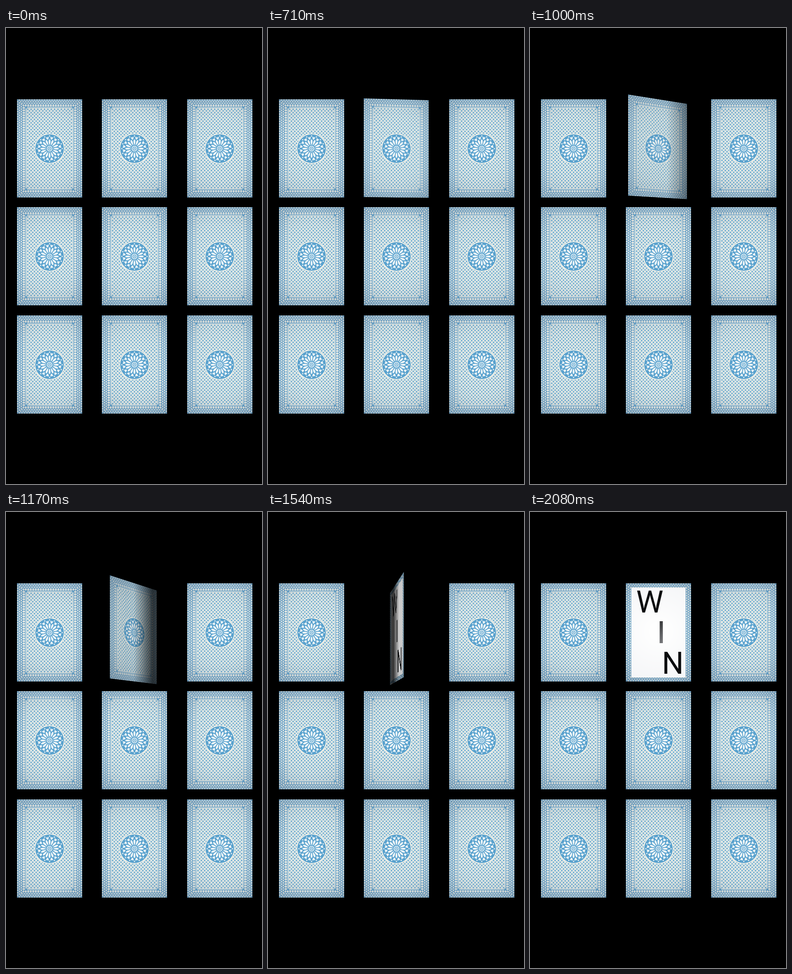
Write an HTML page with a canvas that moves like this. It is 561 by 998 pixels and loops after 2120 ms.

```html
<!DOCTYPE html>
<html lang="en">
<head>
<meta charset="utf-8">
<title>Card flip</title>
<style>
html, body { margin: 0; width: 100%; height: 100%; background: #000; overflow: hidden; }
#stage { position: absolute; left: 0; top: 0; width: 561px; height: 998px;
  perspective: 1030px; perspective-origin: 280.5px 499px; }
.card { position: absolute; width: 143px; height: 215px; }
.flip { transform-style: preserve-3d; }
.face, .face > * { position: absolute; left: 0; top: 0; width: 143px; height: 215px; }
.flip .face { backface-visibility: hidden; }
.front { transform: rotateY(180deg); }
.front .shade { transform: scaleX(-1); }
text { font: 67px Roboto, Lato, sans-serif; text-anchor: middle; fill: #0b0c0e; }
</style>
</head>
<body>
<div id="stage"></div>
<script>
const W = 143, H = 215, BLUE = '#4c9bcb', LINE = '#5a9fcb', CREAM = '#f1f1e8';
const stage = document.getElementById('stage');

function add(parent, tag, cls = '') {
  const el = document.createElement(tag);
  el.className = cls;
  return parent.appendChild(el);
}

// One mitred border side, running along x with its outer edge at y = 0
function side(c, length, depth, inset) {
  c.beginPath();
  c.moveTo(0, 0);
  c.lineTo(length, 0);
  c.lineTo(length - inset, depth);
  c.lineTo(inset, depth);
  c.clip();
  c.fillStyle = '#5496c4';
  c.fillRect(0, 0, length, depth);
  c.scale(1, depth / 19);
  c.fillStyle = '#e9ede6';
  c.fillRect(0, 16.6, length, 1.6);
  const n = Math.round(length / 5.4), step = length / n;
  [[1.8, 1.8], [5.5, 1.8], [9.2, 1.8], [13.9, 3.2]].forEach(([y, h], row) => {
    for (let i = 0; i <= n; i++) {
      const x = (i + row % 2 / 2) * step;
      c.beginPath();
      c.moveTo(x - step / 2, y);
      c.lineTo(x, y - h);
      c.lineTo(x + step / 2, y);
      c.lineTo(x, y + h);
      c.fill();
    }
  });
}

// Four-pointed star with concave sides
function star(c, x, y, r) {
  c.beginPath();
  c.moveTo(x + r, y);
  c.quadraticCurveTo(x, y, x, y + r);
  c.quadraticCurveTo(x, y, x - r, y);
  c.quadraticCurveTo(x, y, x, y - r);
  c.quadraticCurveTo(x, y, x + r, y);
  c.fill();
}

function disc(c, x, y, r, fill) {
  c.fillStyle = fill;
  c.beginPath();
  c.arc(x, y, r, 0, 7);
  c.fill();
}

function rosette(c) {
  const white = '#f4f8f8';
  disc(c, 0, 0, 33, CREAM);
  disc(c, 0, 0, 31.2, BLUE);
  for (let i = 0; i < 16; i++) {
    c.save();
    c.rotate(i * Math.PI / 8);
    c.fillStyle = white;
    c.beginPath();
    c.moveTo(0, -7);
    c.bezierCurveTo(1.6, -12, 3.6, -18, 0, -20.5);
    c.bezierCurveTo(-3.6, -18, -1.6, -12, 0, -7);
    c.fill();
    disc(c, 0, -27.6, 1.5, '#dbe9ef');
    c.rotate(Math.PI / 16);
    c.fillStyle = white;
    c.beginPath();
    c.moveTo(0, -19.5);
    c.quadraticCurveTo(4.8, -25, 1.6, -26);
    c.lineTo(0, -24.6);
    c.lineTo(-1.6, -26);
    c.quadraticCurveTo(-4.8, -25, 0, -19.5);
    c.fill();
    c.restore();
  }
  disc(c, 0, 0, 6, white);
  disc(c, 0, 0, 4.4, BLUE);
  disc(c, 0, 0, 2.8, white);
  disc(c, 0, 0, 1.4, BLUE);
}

function drawCard(parent) {
  const canvas = add(parent, 'canvas');
  canvas.width = W * 2;
  canvas.height = H * 2;
  const c = canvas.getContext('2d');
  c.scale(2, 2);
  c.fillStyle = CREAM;
  c.fillRect(0, 0, W, H);

  const ix = 20, iy = 18;
  for (let i = 0; i < 4; i++) {
    const upright = i % 2;
    c.save();
    c.translate(W / 2, H / 2);
    c.rotate(i * Math.PI / 2);
    c.translate(upright ? -H / 2 : -W / 2, upright ? -W / 2 : -H / 2);
    upright ? side(c, H, ix, iy) : side(c, W, iy, ix);
    c.restore();
  }

  const fw = W - 2 * ix, fh = H - 2 * iy, cols = 14, rows = 24;
  const sx = fw / cols, sy = fh / rows;
  c.save();
  c.beginPath();
  c.rect(ix, iy, fw, fh);
  c.clip();
  c.fillStyle = BLUE;
  for (let j = 0; j <= rows * 2; j++)
    for (let i = 0; i <= cols; i++)
      star(c, ix + (i + j % 2 / 2) * sx, iy + j * sy / 2, 3.5);
  c.restore();
  c.strokeStyle = CREAM;
  c.lineWidth = 3;
  c.strokeRect(ix, iy, fw, fh);
  c.strokeStyle = LINE;
  c.lineWidth = 1.4;
  c.strokeRect(ix - .5, iy - .5, fw + 1, fh + 1);
  c.fillStyle = LINE;
  for (const x of [ix, W - ix])
    for (const y of [iy, H - iy]) c.fillRect(x - 2, y - 2, 4, 4);

  c.save();
  c.translate(W / 2, 108);
  rosette(c);
  c.restore();

  // Soft light around the middle
  const glow = c.createRadialGradient(W / 2, 105, 10, W / 2, 105, 130);
  glow.addColorStop(0, 'rgba(255,255,255,.1)');
  glow.addColorStop(.4, 'rgba(215,220,225,.06)');
  glow.addColorStop(1, 'rgba(50,70,95,.24)');
  c.fillStyle = glow;
  c.fillRect(0, 0, W, H);
  return c;
}

let flip;
for (let i = 0; i < 9; i++) {
  const card = add(stage, 'div', 'card');
  card.style.left = 24 + i % 3 * 186.25 + 'px';
  card.style.top = 155.5 + Math.floor(i / 3) * 236.5 + 'px';
  drawCard(add(card, 'div', 'face'));
  if (i === 1) flip = card;
}

flip.classList.add('flip');
const front = add(flip, 'div', 'face front');
const paper = drawCard(front);
const sheen = paper.createRadialGradient(72, 105, 20, 72, 105, 125);
sheen.addColorStop(0, '#fefefe');
sheen.addColorStop(1, '#f4f5f7');
paper.fillStyle = sheen;
paper.fillRect(12, 9.5, 119, 196.5);
front.insertAdjacentHTML('beforeend', `<svg viewBox="0 0 143 215">
  <linearGradient id="shine" x2="0" y2="1">
    <stop offset=".2" stop-color="#3c3c3e"/><stop offset=".6" stop-color="#66676a"/><stop offset="1" stop-color="#858689"/>
  </linearGradient>
  <text x="52.5" y="64">W</text>
  <text x="77.5" y="130.5">I</text>
  <text x="77.5" y="130.5" id="lit" style="fill:url(#shine)">I</text>
  <text x="103" y="197.5">N</text></svg>`);
const lit = document.getElementById('lit');
const shades = [...flip.children].map(face => add(face, 'div', 'shade'));

// Timing curve with handles (.5, 0) and (.82, 1)
function ease(x) {
  let lo = 0, hi = 1;
  for (let i = 0; i < 24; i++) {
    const u = (lo + hi) / 2, v = 1 - u;
    if (1.5 * u * v * v + 2.46 * u * u * v + u ** 3 < x) lo = u; else hi = u;
  }
  return lo * lo * (3 - 2 * lo);
}

// The shadow grows in from the far edge as the card turns away
function shadow(turn) {
  const from = 90 - 60 * turn, depth = .8 * Math.min(1, 1.3 * turn);
  const base = .2 * turn * turn;
  return `linear-gradient(90deg, rgba(0,0,0,${base}) ${from}%, rgba(0,0,0,${depth}) ${from + 42}%, rgba(0,0,0,${depth * .85}) ${from + 65}%)`;
}

const LOOP = 2120, STEP = 1000 / 24;
let start;
function tick(now) {
  start ??= now;
  const t = Math.floor(((now - start) % LOOP + 5) / STEP) * STEP;
  const x = Math.min(1, Math.max(0, (t - 480) / 1600));
  const angle = x === 1 ? Math.PI : x && ease(x) * Math.PI;
  flip.style.transform = `rotateY(${angle}rad)`;
  const turn = Math.max(0, Math.sin(angle)).toFixed(4);
  for (const s of shades) s.style.background = shadow(turn);
  lit.style.opacity = Math.max(0, -Math.cos(angle)) ** 14;
  requestAnimationFrame(tick);
}
requestAnimationFrame(tick);
</script>
</body>
</html>
```
